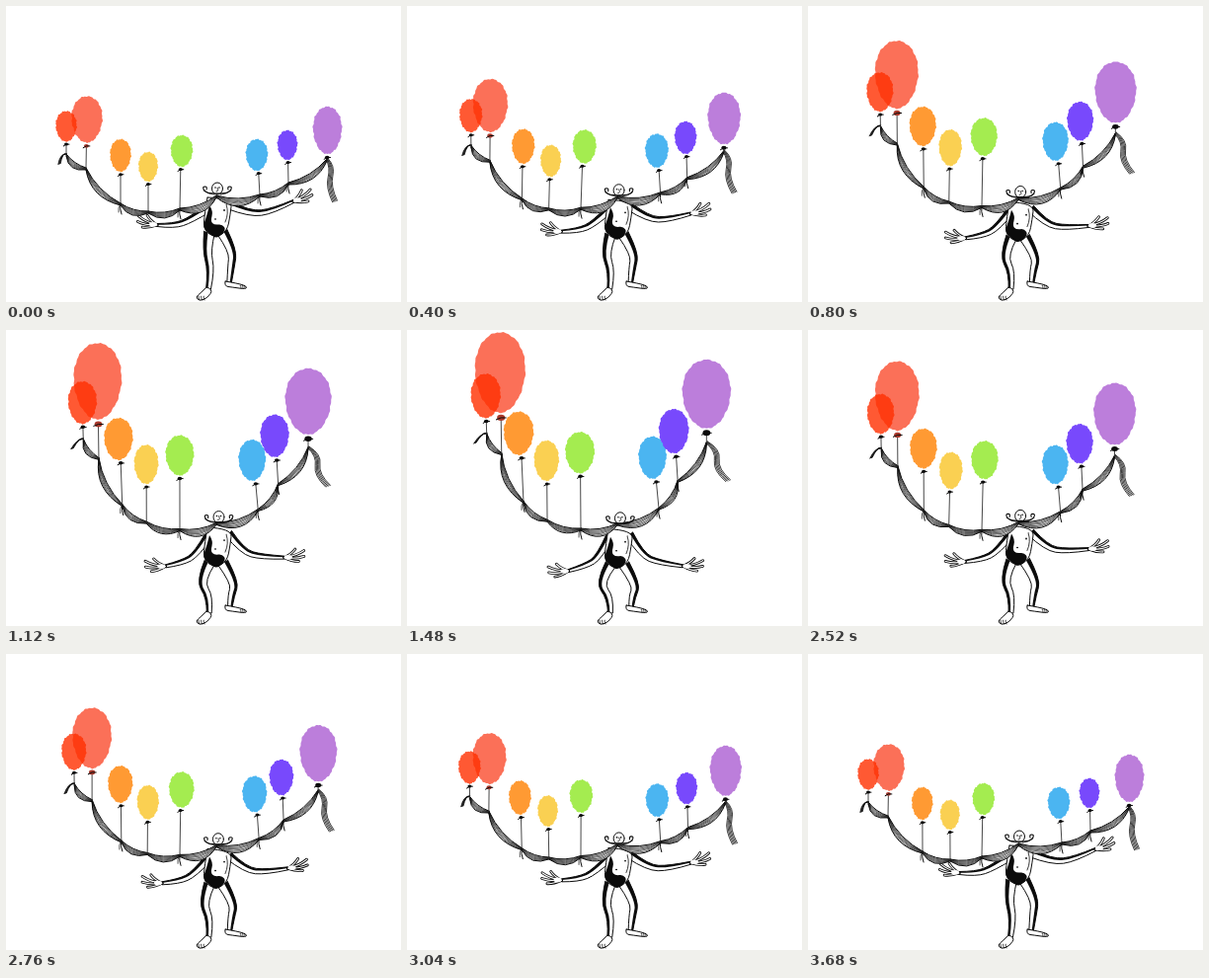
An HTML page with a canvas that plays this animation: 400x300 px, repeating every 3720 ms.

```html
<!DOCTYPE html>
<html lang="en">
<head>
<meta charset="utf-8">
<title>Balloon moustache</title>
<style>
html, body { margin: 0; width: 100%; height: 100%; overflow: hidden; background: #fff; }
canvas { display: block; width: 400px; height: 300px; }
</style>
</head>
<body>
<canvas id="stage" width="400" height="300"></canvas>
<script>
const ctx = document.getElementById('stage').getContext('2d');
const LOOP = 3720, STEP = 40, HALF = 1680, INK = '#0b0b0b';

// Each pose: centre x, centre y, radius x, radius y, rope anchor x, anchor y.
const balloons = [
  { color: 'rgba(255,48,0,.8)', low: [61, 122, 10.5, 15.5, 61, 150], high: [80, 66, 15, 22.5, 81, 104] },
  { color: '#fb7058', low: [82, 115, 15.5, 23.5, 81, 164], high: [94.5, 42, 25.5, 41, 96, 124], knot: '#a8392c' },
  { color: '#ff9a33', low: [116, 151.5, 10.5, 16.5, 116, 200], high: [115, 104, 15, 22, 118, 173], sway: 2 },
  { color: '#fad052', low: [144, 163, 9.7, 15, 144, 208], high: [143, 132, 12.5, 20.5, 142, 192], sway: 1.8 },
  { color: '#a4ec50', low: [178, 147, 11, 16, 176, 205], high: [177, 124, 14.7, 21, 176, 201], sway: 2 },
  { color: '#4bb5f1', low: [254, 151, 11, 16, 257, 191], high: [248.5, 129, 14, 21.5, 255, 180] },
  { color: '#7849fc', low: [285, 141, 10, 15, 286, 179], high: [270, 102, 15, 22.5, 274, 152] },
  { color: '#bc7edb', low: [325.5, 126, 14.5, 24, 325, 155], high: [303, 64, 24.5, 35, 303, 113] }
];

const limbs = {
  leftLeg: { low: [[206, 229], [203, 248], [208, 268], [205, 287]], high: [[206, 238], [194, 257], [206, 271], [206, 287]], width: [5.5, 4, 3.4, 2.4] },
  rightLeg: { low: [[219, 229], [230, 248], [228, 264], [226, 281]], high: [[220, 238], [233, 259], [228, 270], [227, 281]], width: [5.5, 4, 3.4, 2.2] },
  leftArm: { low: [[205, 205], [187, 217], [170, 223], [153, 222]], high: [[206, 208], [195, 231], [181, 240], [164, 245]], width: [4, 3, 2.6, 1.5] },
  rightArm: { low: [[226, 202], [247, 211], [270, 208], [291, 198]], high: [[225, 207], [237, 229], [255, 237], [279, 241]], width: [4, 3, 2.6, 1.5] }
};

const armTiming = [[0, 0], [800, .58], [1550, 1], [2120, .76], [2520, .56], [3040, .32], [3680, 0], [LOOP, 0]];

const lerp = (a, b, k) => a + (b - a) * k;
const mix = (a, b, k) => a.map((v, i) => Array.isArray(v) ? mix(v, b[i], k) : lerp(v, b[i], k));
const bezier = (a, b, s) => 3 * (1 - s) * (1 - s) * s * a + 3 * (1 - s) * s * s * b + s * s * s;

function ease(x) {
  let lo = 0, hi = 1;
  for (let i = 0; i < 20; i++) {
    const mid = (lo + hi) / 2;
    if (bezier(.33, .42, mid) < x) lo = mid; else hi = mid;
  }
  return bezier(0, 1, lo);
}

function keyed(keys, t) {
  const i = keys.findIndex(key => key[0] > t);
  const [t0, a] = keys[i - 1], [t1, b] = keys[i];
  return lerp(a, b, (t - t0) / (t1 - t0));
}

function paint(fill, stroke, width = 1) {
  if (fill) { ctx.fillStyle = fill; ctx.fill(); }
  if (stroke) { ctx.strokeStyle = stroke; ctx.lineWidth = width; ctx.stroke(); }
}

// Continues the current path smoothly through a run of points.
function trace(points) {
  ctx.lineTo(...points[0]);
  for (let i = 1; i < points.length - 1; i++) {
    const [x, y] = points[i], next = points[i + 1];
    const last = i === points.length - 2;
    ctx.quadraticCurveTo(x, y, last ? next[0] : (x + next[0]) / 2, last ? next[1] : (y + next[1]) / 2);
  }
}

function shape(points, fill, stroke, width) {
  ctx.beginPath();
  trace([...points, points[0]]);
  paint(fill, stroke, width);
}

function curve(points, width = 1) {
  ctx.beginPath();
  trace(points);
  paint(null, INK, width);
}

function dot(x, y, rx, ry = rx, fill = INK, stroke) {
  ctx.beginPath();
  ctx.ellipse(x, y, rx, ry, 0, 0, Math.PI * 2);
  paint(fill, stroke);
}

function limb({ low, high, width }, k, shade) {
  const points = mix(low, high, k);
  const side = amount => points.map(([x, y], i) => {
    const a = points[Math.max(0, i - 1)], b = points[Math.min(points.length - 1, i + 1)];
    const len = Math.hypot(b[0] - a[0], b[1] - a[1]);
    const w = width[i] * amount / len;
    return [x - (b[1] - a[1]) * w, y + (b[0] - a[0]) * w];
  });
  const band = (from, to, fill, stroke) => {
    ctx.beginPath();
    trace(side(from));
    trace(side(to).reverse());
    paint(fill, stroke);
  };
  band(-1, 1, '#fff', INK);
  band(shade, shade * .25, INK);
  return points[points.length - 1];
}

function hand([x, y], direction, tilt) {
  for (const [spread, length] of [[-.5, 14], [-.18, 21], [.1, 20], [.42, 15]]) {
    const angle = tilt + spread;
    const at = (r, bend) => [x + direction * r * Math.cos(angle + bend), y + r * Math.sin(angle + bend)];
    const finger = [[x, y], at(length * .6, .12), at(length, -.08)];
    curve(finger, 2.8);
    ctx.beginPath();
    trace(finger);
    paint(null, '#fff', 1.1);
  }
  dot(x + direction * 4, y + 4 * Math.sin(tilt), 4, 2.3, '#fff');
}

function man(k) {
  const drop = 8 * k;
  const shifted = points => points.map(([x, y]) => [x, y + drop]);

  limb(limbs.leftLeg, k, 1);
  limb(limbs.rightLeg, k, -1);
  shape([[203, 285], [197, 291], [192, 295], [196, 299], [204, 296], [210, 287]], '#fff', INK);
  shape([[222, 279], [234, 281], [244, 284], [243, 287], [229, 285], [221, 284]], '#fff', INK);
  for (let i = 0; i < 3; i++) {
    curve([[195 + i * 2.5, 294], [195 + i * 2.5, 296], [196 + i * 2.5, 298]], .7);
    curve([[237 + i * 2, 283], [238 + i * 2, 284], [238 + i * 2, 286]], .7);
  }

  hand(limb(limbs.leftArm, k, 1), -1, lerp(-.2, .08, k));
  hand(limb(limbs.rightArm, k, -1), 1, lerp(-.35, 0, k));

  shape(shifted([[204, 194], [201, 211], [200, 227], [212, 235], [224, 228], [227, 212], [229, 195]]), '#fff', INK);
  shape(shifted([[206, 202], [203, 214], [199, 224], [206, 231], [214, 236], [223, 227], [219, 221], [211, 222], [207, 218], [210, 208]]), INK);
  dot(212, 216 + drop, 1, .8);
  dot(221, 207 + drop, .9);
  curve(shifted([[223, 201], [226, 210], [222, 219]]), .8);
}

function face(k) {
  const x = lerp(214, 216, k), y = lerp(185, 191, k);
  dot(x, y, 5.5, 6, '#fff', INK);
  dot(x - 2, y - 1, .8);
  dot(x + 2, y - 1, .8);
  curve([[x, y - 1], [x + 2, y + 3], [x - 1, y + 3]], .8);
  for (const s of [-1, 1]) {
    curve([[x, y + 5], [x + s * 7, y + 5], [x + s * 13, y + 3], [x + s * 15, y - 2], [x + s * 10, y - 2], [x + s * 11, y + 1]], 1.1);
    curve([[x + s * 3, y + 6], [x + s * 9, y + 6], [x + s * 14, y + 2]], .8);
  }
}

function swag(a, b, thick) {
  const dx = b[0] - a[0], dy = b[1] - a[1], len = Math.hypot(dx, dy);
  const strand = k => {
    const out = len * .16 + k * thick * 1.8;
    const end = k * 2;
    return [[a[0], a[1] + end], [(a[0] + b[0]) / 2 - dy / len * out, (a[1] + b[1]) / 2 + dx / len * out], [b[0], b[1] + end]];
  };
  ctx.beginPath();
  trace(strand(0));
  trace(strand(1).reverse());
  paint('#fff');
  for (let i = 0; i <= 6; i++) curve(strand(i / 6), i % 6 ? .65 : 1);
}

function tail(points, thick) {
  for (let i = 0; i < 5; i++) {
    const gap = (i - 2) * thick / 5;
    curve(points.map(([x, y], n) => [x + gap * (n ? 1 : .3), y - gap * .35]), .8);
  }
}

function rope(anchors, p) {
  const mouth = [213, lerp(192, 196, p)];
  const stops = [...anchors.slice(0, 5), mouth, ...anchors.slice(5)];
  for (let i = 1; i < stops.length; i++) {
    swag(stops[i - 1], stops[i], i === 5 || i === 6 ? 7.5 : 5.5);
  }
  for (const i of [2, 4, 5, 6]) {
    const [x, y] = anchors[i];
    curve([[x, y], [x - 1, y + 6], [x + 1, y + 11]], 1);
    curve([[x, y], [x - 3, y + 5], [x - 2, y + 9]], .7);
  }
  const [lx, ly] = anchors[0];
  tail([[lx, ly], [lx - 5, ly - 1], [lx - lerp(7, 12, p), ly + 10]], 3);
  const [rx, ry] = anchors[7];
  tail([[rx, ry], [rx + lerp(6, 12, p), ry + 8], [rx + lerp(1, 9, p), ry + 28], [rx + lerp(8, 22, p), ry + lerp(43, 39, p)]], 6);
}

function balloon({ color, knot = INK }, [x, y, rx, ry, ax, ay]) {
  const kx = lerp(x, ax, .6), ky = y + ry + 1 + ry * .1;
  ctx.beginPath();
  ctx.moveTo(kx, ky);
  ctx.lineTo(ax, ay + 1);
  paint(null, '#333', .9);
  ctx.beginPath();
  for (let i = 0; i < 120; i++) {
    const a = i / 120 * Math.PI * 2;
    const rough = .35 * Math.sin(13 * a + x * .01) + .3 * Math.sin(29 * a);
    const c = Math.cos(a), s = Math.sin(a);
    ctx.lineTo(x + (rx + rough) * c * (1 - .09 * s), y + (ry + rough) * s);
  }
  paint(color);
  const size = Math.max(2, rx * .16);
  dot(kx, ky, size, size * .75, knot);
  curve([[kx - size - 1, ky + 2], [kx, ky - 1], [kx + size + 1, ky]], 1);
}

function draw(t) {
  const p = ease(Math.max(0, 1 - Math.abs(t - HALF) / HALF));
  const k = keyed(armTiming, t);
  const sway = Math.sin(t / LOOP * Math.PI * 4);
  const poses = balloons.map(b => {
    const pose = mix(b.low, b.high, p);
    pose[0] += (b.sway || 0) * sway;
    return pose;
  });

  ctx.fillStyle = '#fff';
  ctx.fillRect(0, 0, 400, 300);
  man(k);
  rope(poses.map(pose => pose.slice(4)), p);
  face(k);
  for (const i of [1, 0, 2, 3, 4, 5, 6, 7]) balloon(balloons[i], poses[i]);
}

ctx.lineCap = ctx.lineJoin = 'round';
const start = performance.now();
function tick() {
  const t = (performance.now() - start) % LOOP;
  draw(Math.floor(t / STEP) * STEP);
  requestAnimationFrame(tick);
}
tick();
</script>
</body>
</html>
```
